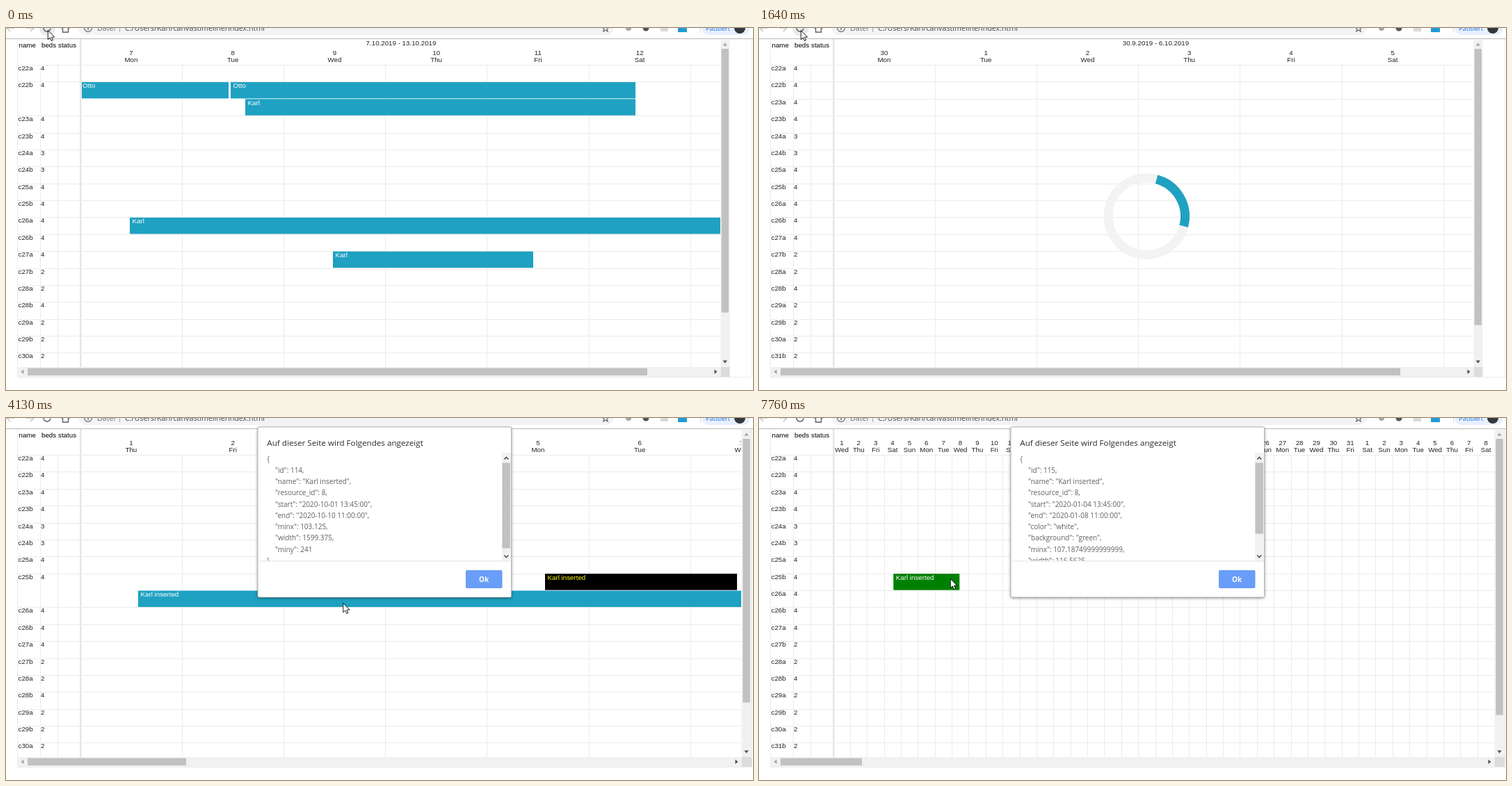
These frames come from a looping animation (1074 by 521 pixels, 8 s). An HTML page with a canvas:

```html
<!DOCTYPE html>
<html lang="de">
<head>
<meta charset="utf-8">
<title>Timeline</title>
<style>
html, body { margin: 0; width: 100%; height: 100%; overflow: hidden; background: #fff; }
canvas { display: block; }
</style>
</head>
<body>
<canvas id="stage" width="1074" height="521"></canvas>
<script>
const ctx = document.getElementById('stage').getContext('2d');
const LOOP = 8000, ZOOM = .8125, TOP = 53.5, ROW = 30 * ZOOM, LEFT = 106.75, BOTTOM = 488;
const ARIAL = '12px "Liberation Sans", Arial, sans-serif';
const UI = '"Open Sans", "Noto Sans", sans-serif';
const BLUE = '#1fa1c2', LINE = '#ebebeb', INK = '#222';
const ROOMS = 'c22a c22b c23a c23b c24a c24b c25a c25b c26a c26b c27a c27b c28a c28b c29a c29b c30a c31b'.split(' ');
const BEDS = '444433444442242222';
const DAYS = 'Sun Mon Tue Wed Thu Fri Sat'.split(' ');

// bars: [slot, from, to, label, background, text colour]
const week = { dayW: 146.25, right: 1027, thumb: 922, titleX: 568, weekday: 1 };
const pages = {
  second: { ...week, title: '7.10.2019 - 13.10.2019', day: 7, month: 31, tall: 1, bars: [
    [1, 109, 320, 'Otto'], [1, 323, 905, 'Otto'], [2, 344, 905, 'Karl'],
    [9, 178, 1027, 'Karl'], [11, 470, 758, 'Karl']] },
  loading: { ...week, title: '30.9.2019 - 6.10.2019', titleX: 570.5, day: 30, month: 30, tall: -1, bars: [] },
  first: { ...week, title: '30.9.2019 - 6.10.2019', titleX: 570.5, day: 30, month: 30, tall: 8, bars: [
    [7, 336.5, 905, 'Karl inserted'], [8, 109, 466, 'Karl'], [9, 178, 758, 'Karl']] },
  october: { dayW: 146.25, right: 1057, thumb: 259, title: 'October 2020', titleX: 583,
    day: 1, weekday: 4, month: 31, tall: 7, bars: [
    [7, 775, 1051, 'Karl inserted', '#000', '#ff0'], [8, 190, 1058, 'Karl inserted']] },
  january: { dayW: 24.375, right: 1057, thumb: 148, title: 'January', titleX: 466.5,
    day: 1, weekday: 3, month: 31, tall: -1, bars: [
    [7, 193.3, 288.3, 'Karl inserted', '#008000']] }
};
const schedule = [[0, 'second'], [500, 'loading'], [1710, 'first'], [2870, 'october'], [6140, 'january']];

// cursor moves in held steps: [first step, last step, count, control point, end point]
const start = [60, 3];
const moves = [
  [2250, 2640, 6, [270, 80], [451, 204]],
  [2710, 2940, 4, [452, 217], [452, 229]],
  [3110, 3260, 3, [462, 250], [484.5, 266]],
  [4650, 5350, 10, [630, 206], [694, 228.5]],
  [6600, 7200, 9, [486, 248], [275, 231]]
];
const fades = [[0, 0], [3960, .3], [4040, .7], [4130, 1], [6060, .4], [6140, 0], [7600, .3], [7680, .7], [7760, 1]];

const common = (id, from, to) => ['{', `"id": ${id},`, '"name": "Karl inserted",', '"resource_id": 8,',
  `"start": "${from} 13:45:00",`, `"end": "${to} 11:00:00",`];
const alerts = {
  october: { end: 187.5, lines: [...common(114, '2020-10-01', '2020-10-10'),
    '"minx": 103.125,', '"width": 1599.375,', '"miny": 241', '}'] },
  january: { end: 166.5, lines: [...common(115, '2020-01-04', '2020-01-08'),
    '"color": "white",', '"background": "green",', '"minx": 107.18749999999999,', '"width": 116.5625,'] }
};

const at = (table, t) => table.filter(e => e[0] <= t).pop()[1];

function rect(x, y, w, h, fill) {
  ctx.fillStyle = fill;
  ctx.fillRect(x, y, w, h);
}

// font sizes are in page pixels; the whole page is shown at ZOOM
function text(str, x, y, fill = INK, font = ARIAL, align = 'left') {
  ctx.save();
  ctx.translate(x, y);
  ctx.scale(ZOOM, ZOOM);
  ctx.font = font;
  ctx.textAlign = align;
  ctx.fillStyle = fill;
  ctx.fillText(str, 0, 0);
  ctx.restore();
}

function path(points, { fill, stroke, width = 1, close = true }) {
  ctx.beginPath();
  points.forEach(([x, y]) => ctx.lineTo(x, y));
  if (close) ctx.closePath();
  paint(fill, stroke, width);
}

function paint(fill, stroke, width) {
  if (fill) { ctx.fillStyle = fill; ctx.fill(); }
  if (stroke) { ctx.strokeStyle = stroke; ctx.lineWidth = width; ctx.stroke(); }
}

function arc(x, y, r, { fill, stroke, width = 1, from = 0, to = Math.PI * 2 }) {
  ctx.beginPath();
  ctx.arc(x, y, r, from, to);
  paint(fill, stroke, width);
}

function round(x, y, w, h, r, fill) {
  ctx.beginPath();
  ctx.roundRect(x, y, w, h, r);
  paint(fill);
}

function clipped(x, y, w, h, draw) {
  ctx.save();
  ctx.beginPath();
  ctx.rect(x, y, w, h);
  ctx.clip();
  draw();
  ctx.restore();
}

function drawToolbar(hover) {
  const pen = { stroke: '#5f6368', width: 1.5, close: false };
  const pale = { ...pen, stroke: '#c4c6c8' };
  path([[12, 0], [1, 0], [6, 5]], pale);
  path([[29, 0], [40, 0], [35, 5]], pale);
  if (hover) arc(59.5, 0, 11.5, { fill: '#e9eaec' });
  arc(59, 0, 5, { ...pen, from: .1, to: 5.3 });
  path([[79, 0], [81.5, 0], [81.5, 6], [89.5, 6], [89.5, 0], [92, 0]], pen);

  round(104, -12, 770, 22, 11, '#f1f3f4');
  arc(118, 0, 5.4, { stroke: '#5f6368', width: 1.2 });
  rect(117.4, -1, 1.3, 4, '#5f6368');
  text('Datei', 131, 4.3, '#6b6f73', '13.2px ' + UI);
  rect(163, -4, 1, 10, '#a9acaf');
  text('C:/Users/Karl/canvastimeline/index.html', 171, 4.3, '#45484b', '13.2px ' + UI);
  path([[857, -1], [860, 1.5], [858.8, 5], [862, 3], [865.2, 5], [864, 1.5], [867, -1]], { ...pen, width: 1.1 });

  arc(895, 0, 4, { fill: '#a6a6a6' });
  arc(920, 0, 4.5, { fill: '#555' });
  rect(941, -5, 11, 10, '#dadada');
  rect(966, -7, 13, 13, '#1f9bd3');
  rect(998, -4, 1, 11, '#d5d7da');
  round(1000, -11, 70, 21, 10, '#e8f0fe');
  text('Pausiert', 1006, 3.8, '#1a73e8', '11.3px ' + UI);
  arc(1055, 0, 8, { fill: '#33383a' });
  rect(0, 15, 1074, 1, '#b9b9b9');
}

function drawLabels(page) {
  text('name', 18.5, 28.3, '#000');
  text('beds', 51, 28.3, '#000');
  text('status', 75, 28.3, '#000');
  let y = TOP;
  ROOMS.forEach((room, i) => {
    rect(17, Math.floor(y), page.right - 17, 1, LINE);
    text(room, 17.5, y + 7.6);
    text(BEDS[i], 50, y + 7.6);
    y += ROW * (i === page.tall ? 2 : 1);
  });
}

function drawDays(page) {
  for (let i = 0, x = LEFT; x < page.right; i++, x += page.dayW) {
    const mid = x + page.dayW / 2;
    if (i) rect(Math.round(x - .3), 54, 1, BOTTOM - 54, LINE);
    text((page.day + i - 1) % page.month + 1, mid, 39, INK, ARIAL, 'center');
    text(DAYS[(page.weekday + i) % 7], mid, 48.8, INK, ARIAL, 'center');
  }
}

function drawBars(page) {
  page.bars.forEach(([slot, from, to, label, fill = BLUE, ink = '#fff']) => {
    const y = TOP + slot * ROW;
    rect(from, y, to - from, 23.5, fill);
    text(label, from === 109 ? 110 : from + 3.5, y + 8.6, ink);
  });
}

function arrow(x, y, dx, dy, fill) {
  path([[x + dx * 2, y + dy * 2], [x - dx * 2 - dy * 3.2, y - dy * 2 - dx * 3.2],
    [x - dx * 2 + dy * 3.2, y - dy * 2 + dx * 3.2]], { fill });
}

function drawScrollbars(page) {
  const { right } = page, width = right === 1027 ? 13 : 14.5, mid = right + width / 2 + .3;
  rect(right + .5, 17, width, 485, '#f1f1f1');
  rect(17, BOTTOM, right - 16, 14, '#f1f1f1');
  rect(right + 1, BOTTOM, width - .5, 14, '#dcdcdc');
  rect(mid - 5.2, 30, 10.4, page.tall < 0 ? 397.5 : 379.5, '#c1c1c1');
  rect(31, 489.5, page.thumb - 31, 10.5, '#c1c1c1');
  arrow(mid, 23.5, 0, -1, '#a3a3a3');
  arrow(mid, 480.5, 0, 1, '#505050');
  arrow(23.5, 494.8, -1, 0, '#a3a3a3');
  arrow(right - 6.5, 494.8, 1, 0, '#505050');
}

function drawPage(page) {
  rect(16, 16, 1, 486, LINE);
  rect(1072, 16, 1, 486, LINE);
  rect(16, 502, 1057, 1, LINE);
  clipped(16, 16, page.right - 16, BOTTOM - 16, () => {
    rect(49, 54, 1, 440, LINE);
    rect(74, 54, 1, 440, LINE);
    rect(106, 16, 2.5, 480, '#e6e6e6');
    drawLabels(page);
    drawDays(page);
    text(page.title, page.titleX, 25, INK, ARIAL, 'center');
    drawBars(page);
  });
  drawScrollbars(page);
}

function drawSpinner(t) {
  const held = Math.floor((t - 495) / 75) * 75 + 495;
  const mid = (114 + (held - 1020) * .36) * Math.PI / 180;
  arc(557.3, 271, 55.2, { stroke: '#f3f3f3', width: 13 });
  arc(557.3, 271, 55.2, { stroke: BLUE, width: 13, from: mid - Math.PI / 4, to: mid + Math.PI / 4 });
}

function drawAlert({ lines, end }, alpha, pressed) {
  ctx.save();
  ctx.globalAlpha = alpha;
  ctx.save();
  ctx.shadowColor = 'rgba(0,0,0,.5)';
  ctx.shadowBlur = 4;
  ctx.shadowOffsetY = 1;
  round(362, 13, 364.5, 245, 2, '#fff');
  ctx.restore();
  ctx.strokeStyle = '#a8a8a8';
  ctx.lineWidth = .8;
  ctx.beginPath();
  ctx.roundRect(362, 13, 364.5, 245, 2);
  ctx.stroke();

  text('Auf dieser Seite wird Folgendes angezeigt', 375.3, 39.5, '#2b2b2b', '14.35px ' + UI);
  clipped(363, 50, 363, 155.5, () => {
    lines.forEach((line, i) => text(line, line.length > 1 ? 387 : 375.3, 62.6 + i * 16.25, '#5c5f62', '12.3px ' + UI));
    rect(713, 50, 12.5, 156, '#f1f1f1');
    rect(713.5, 64.5, 11.5, end - 64.5, '#c1c1c1');
    const chevron = { stroke: '#505050', width: 1.6, close: false };
    path([[716.3, 59.5], [719.3, 56.5], [722.3, 59.5]], chevron);
    path([[716.3, 197.5], [719.3, 200.5], [722.3, 197.5]], chevron);
  });
  rect(363, 205.5, 363, 1, '#e4e4e4');
  round(661, 219, 52.5, 26, 2, pressed ? '#5a8cec' : '#699df8');
  text('Ok', 687, 235.6, '#fff', 'bold 12.3px ' + UI, 'center');
  ctx.restore();
}

function cursorAt(t) {
  let pos = start;
  for (const [t0, t1, count, via, end] of moves) {
    if (t < t0) break;
    const step = Math.floor((t - t0) / (t1 - t0) * (count - 1) + 1.001);
    const x = Math.min(1, step / count);
    const e = (x + 2 * x * x * (3 - 2 * x)) / 3;
    pos = pos.map((p, i) => p * (1 - e) ** 2 + via[i] * 2 * e * (1 - e) + end[i] * e * e);
  }
  return pos;
}

function drawCursor([x, y]) {
  const shape = [[0, 0], [0, 13.2], [3, 10.4], [5, 15], [7.2, 14], [5.2, 9.7], [9.3, 9.5]];
  path(shape.map(([px, py]) => [x + px + .3, y + py + .5]), { fill: '#fff', stroke: '#000', width: .9 });
}

function draw(t) {
  const name = at(schedule, t), alpha = at(fades, t), pos = cursorAt(t);
  rect(0, 0, 1074, 521, '#fff');
  drawToolbar(t < 2250);
  drawPage(pages[name]);
  if (name === 'loading') drawSpinner(t);
  if (alpha) drawAlert(alerts[name], alpha, t >= 5900 && t < 5970);
  drawCursor(pos);
}

const began = performance.now();
function tick() {
  draw((performance.now() - began) % LOOP);
  requestAnimationFrame(tick);
}
tick();
</script>
</body>
</html>
```
